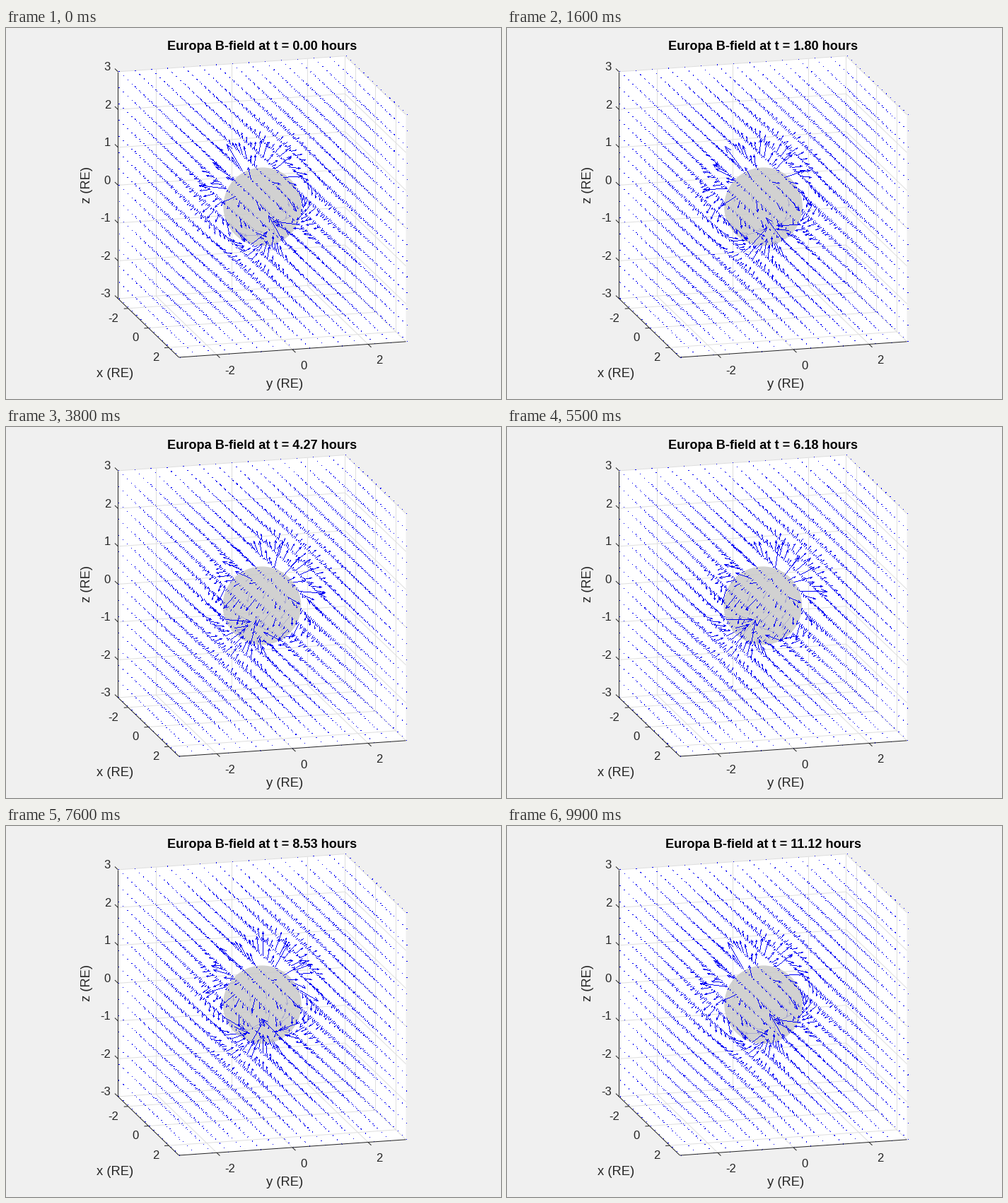
Write a matplotlib script that moves like this. It is 700x525 px and loops after 10 s.

```python
import numpy as np
import matplotlib.pyplot as plt
from matplotlib.animation import FuncAnimation
from matplotlib.patches import Circle, Polygon

W, H, DPI = 700, 525, 100
FRAMES, INTERVAL = 100, 100
PERIOD = 11.23                  # hours per loop
UNIT = 55.4                     # pixels per radius
CENTER = np.array([361.95, 252.8])
AZ, EL = np.radians(75), np.radians(15)
LIM = 3
DARK, GRID, BLUE = "#262626", "#dfdfdf", "#0000f5"
PX = 72 / DPI                   # points per pixel

RIGHT = np.array([np.cos(AZ), np.sin(AZ), 0])
UP = np.array([-np.sin(AZ) * np.sin(EL), np.cos(AZ) * np.sin(EL), np.cos(EL)])
VIEW = np.cross(RIGHT, UP)
SCREEN = UNIT * np.stack([RIGHT, -UP], axis=1)


def project(p):
    return CENTER + np.asarray(p, float) @ SCREEN


plt.rcParams["font.family"] = "Liberation Sans"
fig = plt.figure(figsize=(W / DPI, H / DPI), dpi=DPI, facecolor="#f0f0f0")
ax = fig.add_axes([0, 0, 1, 1])
ax.set_xlim(0, W)
ax.set_ylim(H, 0)
ax.axis("off")


def line(a, b, color, z):
    ax.plot(*zip(a, b), color=color, lw=PX, zorder=z, solid_capstyle="butt")


def label(x, y, s, size=16.67, **kw):
    kw.setdefault("color", DARK)
    return ax.text(x, y, s, fontsize=size * PX, va="baseline", zorder=8, **kw)


def draw_box():
    lo, hi = -LIM, LIM
    outline = [(lo, lo, hi), (lo, hi, hi), (hi, hi, hi),
               (hi, hi, lo), (hi, lo, lo), (lo, lo, lo)]
    ax.add_patch(Polygon(project(outline), fc="white", ec="none", zorder=0))

    def grid(a, b):
        line(project(a), project(b), GRID, 1)

    for v in (-2, 0, 2):
        grid((lo, v, lo), (lo, v, hi))
        grid((lo, v, lo), (hi, v, lo))
        grid((v, hi, lo), (v, hi, hi))
        grid((v, lo, lo), (v, hi, lo))
    for v in range(lo, hi + 1):
        grid((lo, lo, v), (lo, hi, v))
        grid((lo, hi, v), (hi, hi, v))
    grid((lo, hi, lo), (lo, hi, hi))

    corner = project((hi, lo, lo))
    left = project((lo, lo, lo))
    line(left, project((lo, lo, hi)), DARK, 6)
    line(left, corner, DARK, 6)
    line(corner, project((hi, hi, lo)), DARK, 6)


def draw_ticks():
    for v in range(-LIM, LIM + 1):
        p = project((-LIM, -LIM, v))
        line(p, p + (-4.5, -4.3), DARK, 6)
        label(148, p[1] - 1.5, str(v), ha="right")
    for v in (-2, 0, 2):
        p = project((v, -LIM, -LIM))
        line(p, p + (-6, 0.4), DARK, 6)
        label(p[0] - 14, p[1] + 19, str(v), ha="right")
        p = project((LIM, v, -LIM))
        line(p, p + (4.5, 4.3), DARK, 6)
        label(p[0] + 11, p[1] + 28, str(v), ha="left")


draw_box()
draw_ticks()
label(154, 494, "x (RE)", 18.33, ha="center")
label(394, 509, "y (RE)", 18.33, ha="center")
label(119, 222, "z (RE)", 18.33, ha="center", rotation=90,
      rotation_mode="anchor")
title = label(362.5, 31.3, "", 18.2, ha="center", color="black",
              weight="bold")

ball = ax.add_patch(Circle(CENTER, UNIT, fc="0.79", ec="none", alpha=0.85,
                           zorder=3))

# Lattice points outside the moon
axis = np.linspace(-LIM, LIM, 15)
pts = np.stack(np.meshgrid(axis, axis, axis, indexing="ij"), -1).reshape(-1, 3)
pts = pts[np.linalg.norm(pts, axis=1) > 1]
dist = np.linalg.norm(pts, axis=1, keepdims=True)
unit = pts / dist
tails = project(pts)
front = pts @ VIEW > -0.35
MAX_LEN = 0.8


def pixel_layer(z):
    return ax.plot([], [], ",", color=BLUE, zorder=z)[0]


back_arrows, front_arrows = pixel_layer(2), pixel_layer(4)


def dipole(m):
    b = (3 * (unit @ m)[:, None] * unit - m) / dist ** 3
    return b * MAX_LEN / np.linalg.norm(b, axis=1).max()


def trace(a, b):
    """Pixel centres along crisp one-pixel lines from a to b."""
    a, b = np.floor(a), np.floor(b)
    n = np.abs(b - a).max(axis=1).astype(int) + 1
    step = np.arange(n.sum()) - np.repeat(np.cumsum(n) - n, n)
    t = step / np.repeat(np.maximum(n - 1, 1), n)
    p = np.repeat(a, n, axis=0) + t[:, None] * np.repeat(b - a, n, axis=0)
    return (np.floor(p + 0.5) + 0.5).T


def arrow_pixels(start, d):
    tip = start + d
    side = 0.07 * np.stack([-d[:, 1], d[:, 0]], axis=1)
    neck = tip - 0.2 * d
    return trace(np.concatenate([start, tip, tip]),
                 np.concatenate([tip, neck + side, neck - side]))


def update(i):
    c = np.cos(2 * np.pi * i / FRAMES)
    shift = np.array([0.3 + 0.5 * c, 0])
    d = dipole(np.array([-0.217 * c, -0.54 * c, 1.0])) @ SCREEN
    start = tails + shift
    back_arrows.set_data(*arrow_pixels(start[~front], d[~front]))
    front_arrows.set_data(*arrow_pixels(start[front], d[front]))
    ball.center = CENTER + shift
    title.set_text(f"Europa B-field at t = {PERIOD * i / FRAMES:.2f} hours")
    return back_arrows, front_arrows, ball, title


ani = FuncAnimation(fig, update, frames=FRAMES, interval=INTERVAL,
                    repeat=True, repeat_delay=0, blit=False)
plt.show()
```
